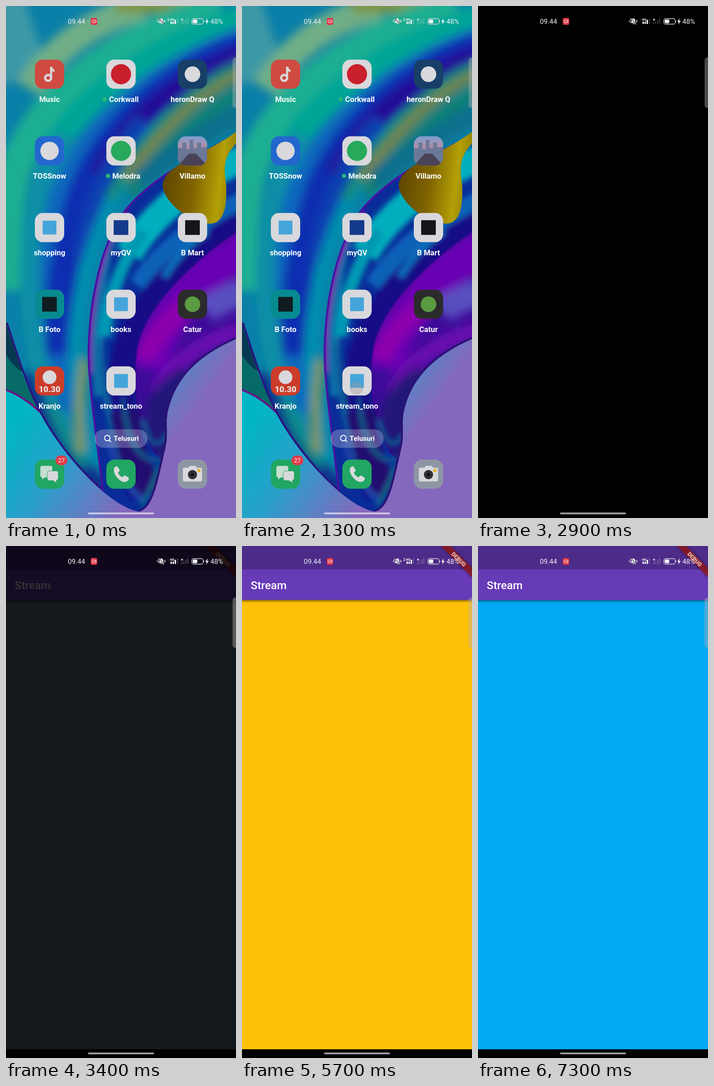
An HTML page for the animation above (8000 ms loop, 502 by 1115 pixels).

```html
<!DOCTYPE html>
<html lang="id">
<head>
<meta charset="utf-8">
<title>Home screen to Stream app</title>
<style>
  html, body { margin: 0; width: 100%; height: 100%; overflow: hidden; background: #000; }
  svg { display: block; width: 100vw; height: 100vh; font-family: Roboto, sans-serif; }
  .bands path { fill: none; }
  .label { font-size: 16.5px; font-weight: 700; fill: #fff; }
</style>
</head>
<body>
<svg viewBox="0 0 502 1115" preserveAspectRatio="none">
  <defs>
    <filter id="soft" x="-20%" y="-20%" width="140%" height="140%"><feGaussianBlur stdDeviation="10"/></filter>
    <filter id="fine" x="-20%" y="-20%" width="140%" height="140%"><feGaussianBlur stdDeviation="6"/></filter>
    <filter id="shade" x="-20%" y="-100%" width="140%" height="300%"><feGaussianBlur stdDeviation="2.5"/></filter>
    <linearGradient id="floor" gradientUnits="userSpaceOnUse" x1="20" y1="900" x2="270" y2="1080">
      <stop offset="0" stop-color="#00b6c4"/><stop offset=".45" stop-color="#2a9fca"/><stop offset="1" stop-color="#8468be"/>
    </linearGradient>
    <linearGradient id="gold" x1="0" y1=".3" x2="1" y2=".45">
      <stop offset="0" stop-color="#5c4300"/><stop offset=".45" stop-color="#806400"/>
      <stop offset=".8" stop-color="#b3a007"/><stop offset="1" stop-color="#8d7c04"/>
    </linearGradient>
    <linearGradient id="city" x1="0" y1="0" x2="0" y2="1">
      <stop offset="0" stop-color="#7d9fd0"/><stop offset=".5" stop-color="#c08a9a"/><stop offset="1" stop-color="#6a4c62"/>
    </linearGradient>
    <clipPath id="petal"><path d="M0 0H502V725C430 757 375 800 355 875C346 905 356 930 347 965C332 1030 322 1095 290 1101C225 1090 120 975 72 882C40 820 20 750 0 690Z"/></clipPath>
    <clipPath id="inner"><path id="innerEdge" d="M530 262C450 310 335 355 262 440C196 525 172 690 180 800C188 900 205 1000 215 1115H530Z"/></clipPath>
    <clipPath id="fold"><path id="foldEdge" d="M530 472C430 535 300 645 284 750C270 850 295 960 350 1000H530Z"/></clipPath>
    <clipPath id="tile"><rect x="-32" y="-32" width="64" height="64" rx="18"/></clipPath>
  </defs>

  <g id="wallpaper">
    <rect width="502" height="1115" fill="url(#floor)"/>
    <path d="M0 690C25 780 50 840 75 885Q35 850 0 836Z" fill="#056a68"/>
    <path d="M0 690C15 740 30 775 42 800Q20 790 0 760Z" fill="#073a52"/>
    <path d="M0 836Q38 850 75 885" fill="none" stroke="#6a1288" stroke-width="4"/>
    <g clip-path="url(#petal)">
      <rect width="502" height="1115" fill="#0a7fa8"/>
      <g class="bands" id="outer" filter="url(#soft)"></g>
      <path d="M0 690C20 750 40 820 72 882C120 975 225 1090 290 1101" fill="none" stroke="#2a1280" stroke-width="8"/>
      <g clip-path="url(#inner)">
        <rect width="502" height="1115" fill="#0a2c98"/>
        <g class="bands" id="middle" filter="url(#fine)"></g>
        <use href="#innerEdge" fill="none" stroke="#4a10a4" stroke-width="8"/>
        <g clip-path="url(#fold)">
          <rect width="502" height="1115" fill="#3c0c98"/>
          <g class="bands" id="front" filter="url(#soft)"></g>
          <use href="#foldEdge" fill="none" stroke="#2a0888" stroke-width="5"/>
        </g>
        <g class="bands" id="tip" filter="url(#fine)"></g>
      </g>
      <path d="M502 725C430 757 375 800 355 875C346 905 356 930 347 965C332 1030 322 1095 290 1101" fill="none" stroke="#2a1272" stroke-width="8"/>
    </g>
    <path d="M502 274C440 322 342 345 342 392C346 430 405 474 445 474C480 474 483 425 480 385C474 345 478 325 502 300Z" fill="url(#gold)"/>
  </g>

  <g id="home"></g>

  <g id="bars"><rect width="502" height="51" opacity=".74"/><rect y="1096" width="502" height="19" opacity=".65"/></g>
  <rect id="window"/>

  <g id="app">
    <rect width="502" height="1096"/>
    <rect id="body" y="117" width="502" height="979"/>
    <rect x="-10" y="100" width="522" height="20" opacity=".5" filter="url(#shade)"/>
    <rect width="502" height="51" fill="#4d2b89"/>
    <rect y="51" width="502" height="66.5" fill="#673ab7"/>
    <text x="19" y="93.5" font-size="24.3" font-weight="500" fill="#fff">Stream</text>
    <g transform="translate(502 0) rotate(45)">
      <rect x="-48" y="33.6" width="96" height="14.4" opacity=".55" filter="url(#shade)"/>
      <rect x="-48" y="33.6" width="96" height="14.4" fill="#b71c1c" opacity=".63"/>
      <text y="45.2" text-anchor="middle" font-size="12.2" font-weight="900" fill="#e9c3bf">DEBUG</text>
    </g>
  </g>

  <g id="status" fill="#f2f2f4">
    <text x="135" y="39" font-size="15">09.44</text>
    <rect x="185" y="26" width="14" height="15" rx="3" fill="#dc3545"/>
    <rect x="188" y="30.5" width="7.5" height="6" rx="1.5" fill="none" stroke="#fff"/>
    <circle cx="191.7" cy="33.5" r="1"/><path d="M195.5 33.5l2-1.7v3.4z"/>
    <path d="M333 37q2-1.500 2-5 0-4.500 4-5 4 .5 4 5 0 3.500 2 5zM337 38h4q-2 3-4 0z"/>
    <path d="M333 27L345 40" stroke="#333" stroke-width="2.600"/>
    <path d="M332.500 27L344.500 40M332 30v6M329.500 32v2M346 30v6M348 32v2" stroke="#f2f2f4" stroke-width="1.200"/>
    <path id="arrows" d="M351.800 29l2.400-2.500 2.400 2.500zM351.800 31l2.400 2.500 2.400-2.500z"/>
    <text x="357.500" y="32" font-size="8" font-weight="700">4G</text>
    <path d="M359 34h3v5h-3zM363.500 34h3v5h-3zM368 30h3v9h-3z"/>
    <path d="M373 27h2.500v12H373zM382 35h2.500v4H382zM386.500 33h2.500v6h-2.500zM391 30h2.500v9H391zM395.500 27h2.500v12h-2.500z" opacity=".22"/>
    <path d="M382.500 28l3.500 3.500M386 28l-3.500 3.500" stroke="#f2f2f4" stroke-width="1.200"/>
    <rect x="405.500" y="27.500" width="25" height="12" rx="4" fill="none" stroke="#d5d5d9" stroke-width="1.300"/>
    <rect x="407.500" y="29.500" width="10" height="8" rx="2"/>
    <path d="M431.500 31.500v4" stroke="#d5d5d9" stroke-width="1.500"/>
    <path d="M440 26.500l-5 8h3l-1 6 5.500-8h-3.500z"/>
    <text x="446" y="39" font-size="15">48%</text>
  </g>
  <rect x="494.500" y="112" width="14" height="110" rx="6" fill="#b6b0b4" opacity=".42"/>
  <rect x="179" y="1103" width="144" height="4" rx="2" fill="#fff" opacity=".6"/>
  <circle id="touch" cx="250" cy="832" r="13" fill="#a49ca0" fill-opacity=".38" stroke="#888" stroke-opacity=".2" stroke-width="3"/>
</svg>

<script>
const $ = id => document.getElementById(id);
const set = (el, attrs) => { for (const k in attrs) el.setAttribute(k, attrs[k]); };

// Wallpaper: blurred strokes [colour, width, curve]
const bands = {
  outer: [
    ['#3d98a6', 130, 'M-30 -20L30 160'],
    ['#6fae86', 60, 'M300 0C200 30 110 80 50 180'],
    ['#7f9440', 34, 'M240 -2H440'],
    ['#1fae92', 70, 'M470 5C270 60 80 180 18 360C0 430 -5 520 -5 620'],
    ['#03a596', 56, 'M530 22C330 85 160 190 85 340'],
    ['#078fa6', 46, 'M130 280C60 400 40 540 60 700C75 800 105 900 150 1000'],
    ['#0868bc', 44, 'M530 62C350 120 165 250 110 430C80 560 95 720 140 880'],
    ['#0a2fb0', 62, 'M530 84C370 135 205 270 158 430C125 550 110 640 118 760'],
    ['#220c98', 46, 'M530 100C400 145 265 240 205 370'],
    ['#0b3fb0', 36, 'M300 250C225 330 180 440 165 560'],
    ['#068fae', 30, 'M290 330C220 420 165 560 152 720C147 830 165 930 200 1030'],
    ['#148a74', 22, 'M530 124C430 155 315 260 225 420'],
    ['#77844a', 22, 'M530 142C430 180 335 275 262 375'],
    ['#108074', 30, 'M530 180C440 220 355 290 270 410'],
    ['#0a6f8c', 46, 'M530 228C450 260 370 320 290 380'],
    ['#10308c', 40, 'M40 800C80 910 190 1060 290 1090'],
    ['#0a8a88', 22, 'M95 860C115 920 140 960 175 1000'],
    ['#8c974e', 17, 'M172 770C160 850 155 910 165 970']
  ],
  middle: [
    ['#0a6fa8', 26, 'M235 480C200 580 195 700 205 850'],
    ['#04aebd', 60, 'M520 330C420 375 320 450 268 540'],
    ['#0499b4', 28, 'M300 490C250 560 222 640 215 720'],
    ['#0a62b8', 46, 'M530 420C430 470 350 520 290 610'],
    ['#130c86', 62, 'M530 470C410 530 280 640 255 790C245 900 260 980 300 1060'],
    ['#0a6cb8', 16, 'M440 490Q380 530 345 590'],
    ['#7a0cac', 16, 'M262 440C196 525 172 690 180 800'],
    ['#08609e', 14, 'M206 740C212 850 230 950 290 1060']
  ],
  front: [
    ['#6a05b4', 80, 'M530 530C430 570 330 690 310 790'],
    ['#8c05ac', 44, 'M410 640C360 680 320 720 300 770'],
    ['#5850c0', 56, 'M520 620C480 640 450 650 435 665'],
    ['#6a08b0', 34, 'M520 705C420 730 360 780 330 840'],
    ['#241278', 60, 'M400 810C330 850 320 890 335 990']
  ],
  tip: [
    ['#22116f', 60, 'M260 880C270 960 285 1020 320 1060'],
    ['#0a5c8c', 9, 'M255 850C262 960 300 1000 342 985'],
    ['#0c7298', 7, 'M300 900C315 970 340 960 350 930'],
    ['#2346ac', 12, 'M225 950C250 1030 275 1060 300 1075'],
    ['#10708a', 8, 'M335 1000Q320 1050 295 1088']
  ]
};
for (const id in bands)
  $(id).innerHTML = bands[id].map(([c, w, d]) => `<path d="${d}" stroke="${c}" stroke-width="${w}"/>`).join('');

// Home screen
const pale = '#d9d8dc';
const disc = (c, r = 19) => `<circle r="${r}" fill="${c}"/>`;
const block = (c, s = 30) => `<rect x="${-s / 2}" y="${-s / 2}" width="${s}" height="${s}" fill="${c}"/>`;
const note = `<circle cx="-3" cy="8" r="6.500" fill="none" stroke="${pale}" stroke-width="5"/><path d="M3.500 8V-16Q5 -8 11 -7" fill="none" stroke="${pale}" stroke-width="4.500"/>`;
const town = '<path d="M-32 10V-6h10v-12h9v14h7v-20h8v18h8v-12h9v10h13V32h-64z" fill="#6c7898"/><path d="M-32 32L-8 6H8L32 32z" fill="#4a4358"/>';
const sale = `<circle cy="-8" r="15" fill="${pale}"/><text y="24" text-anchor="middle" font-size="18" font-weight="900" fill="#e6e2e0">10.30</text>`;
const chat = `<path d="M-16 -18H2q4 0 4 4V3q0 4-4 4h-12l-6 5v-5q-4 0-4-4v-17q0-4 4-4z" fill="#c7ded0"/><path d="M0 -7h14q5 0 5 5V9q0 4-4 4v6l-7-5H0q-5 0-5-5V-2q0-5 5-5z" fill="${pale}" stroke="#23a565"/>`;
const phone = `<path d="M-15 -13q3-5 7-4l5 8q0 3-4 6 4 7 10 10 3-4 6-4l8 5q1 5-5 8-9 4-20-8-10-12-7-21z" fill="${pale}"/>`;
const camera = `<path d="M-18 -14h9l3-4H7l3 4h8q3 0 3 3v23q0 4-4 4h-34q-4 0-4-4v-23q0-3 3-3z" fill="${pale}"/><circle cy="1" r="10" fill="#2b2b31"/><circle cy="1" r="5" fill="#111" stroke="#55555e"/><circle cx="14" cy="-8" r="3.500" fill="#e3b321"/>`;

// [column, row, tile colour, picture, label, start of a dotted label]
const apps = [
  [0, 0, '#cf4a41', note, 'Music'],
  [1, 0, pale, disc('#c9202c', 22), 'Corkwall', 225],
  [2, 0, '#173f68', disc(pale, 17), 'heronDraw Q'],
  [0, 1, '#2367ce', disc(pale, 20), 'TOSSnow'],
  [1, 1, pale, disc('#27a95c', 22), 'Melodra', 232],
  [2, 1, 'url(#city)', town, 'Villamo'],
  [0, 2, pale, block('#45a5da'), 'shopping'],
  [1, 2, pale, block('#143a8c', 32), 'myQV'],
  [2, 2, pale, block('#15151a', 32), 'B Mart'],
  [0, 3, '#078b91', block('#101c20', 32), 'B Foto'],
  [1, 3, pale, block('#45a5da'), 'books'],
  [2, 3, '#2b2b2b', disc('#5b9b42', 17), 'Catur'],
  [0, 4, '#cc3c2a', sale, 'Kranjo'],
  [1, 4, pale, block('#45a5da'), 'stream_tono'],
  [0, 5.216, '#21a663', chat],
  [1, 5.216, '#21a663', phone],
  [2, 5.216, '#8e96a4', camera]
];
const drawApp = ([col, row, tile, art, label, start]) => {
  const x = 95 + col * 156, y = 148.5 + row * 167;
  const text = !label ? '' : start
    ? `<circle cx="${start - 9.5}" cy="${y + 54.5}" r="4.500" fill="#2db777"/><text class="label" x="${start}" y="${y + 60.5}">${label}</text>`
    : `<text class="label" x="${x}" y="${y + 60.5}" text-anchor="middle">${label}</text>`;
  return `<g transform="translate(${x} ${y})" clip-path="url(#tile)"><rect x="-32" y="-32" width="64" height="64" fill="${tile}"/>${art}</g>${text}`;
};
$('home').innerHTML = apps.map(drawApp).join('') + `
  <rect x="193" y="922" width="116" height="40" rx="20" fill="#d8d4ec" opacity=".3"/>
  <circle cx="221" cy="941" r="6" fill="none" stroke="#fff" stroke-width="1.800"/><path d="M225.500 945.500l4 4" stroke="#fff" stroke-width="1.800"/>
  <text x="235" y="947" font-size="15" font-weight="700" fill="#fff">Telusuri</text>
  <rect x="108" y="979" width="26" height="21" rx="10.500" fill="#e03a48"/>
  <text x="121" y="994" text-anchor="middle" font-size="13" fill="#fff">27</text>`;

// Timeline
const colours = [[0, '#607d8b'], [5100, '#ffc107'], [6100, '#673ab7'], [7000, '#03a9f4']];
const clamp = v => Math.max(0, Math.min(1, v));
const mix = (a, b, p) => a + (b - a) * p;

function draw(now) {
  const t = Math.floor(now % 8000 / 100) * 100;   // the screen updates ten times a second
  const open = clamp((t - 1400) / 400);
  const left = mix(219, 0, open ** .6), top = mix(784, 0, open ** .835), bottom = mix(848, 1115, open ** 1.64);

  const s = 1 - .11 * open;
  set($('home'), { transform: `translate(251 557.5) scale(${s}) translate(-251 -557.5)`, opacity: clamp(1 - 1.4 * open) });
  set($('bars'), { opacity: clamp(open * 2) });
  set($('window'), {
    x: left, y: top, width: 502 - 2 * left, height: bottom - top,
    rx: open < 1 ? mix(18, 58, clamp(open * 2)) : 0,
    opacity: open > 0 ? 1 : 0
  });
  set($('touch'), { opacity: t >= 1300 && t < 1700 ? 1 : 0 });
  set($('app'), { opacity: clamp((t - 3300) / 500) });
  set($('body'), { fill: colours.findLast(c => t >= c[0])[1] });
  set($('arrows'), { opacity: t < 2900 || (t >= 4900 && t < 7000) ? 1 : .15 });
}

const begin = performance.now();
function loop() {
  draw(performance.now() - begin);
  requestAnimationFrame(loop);
}
loop();
</script>
</body>
</html>
```
